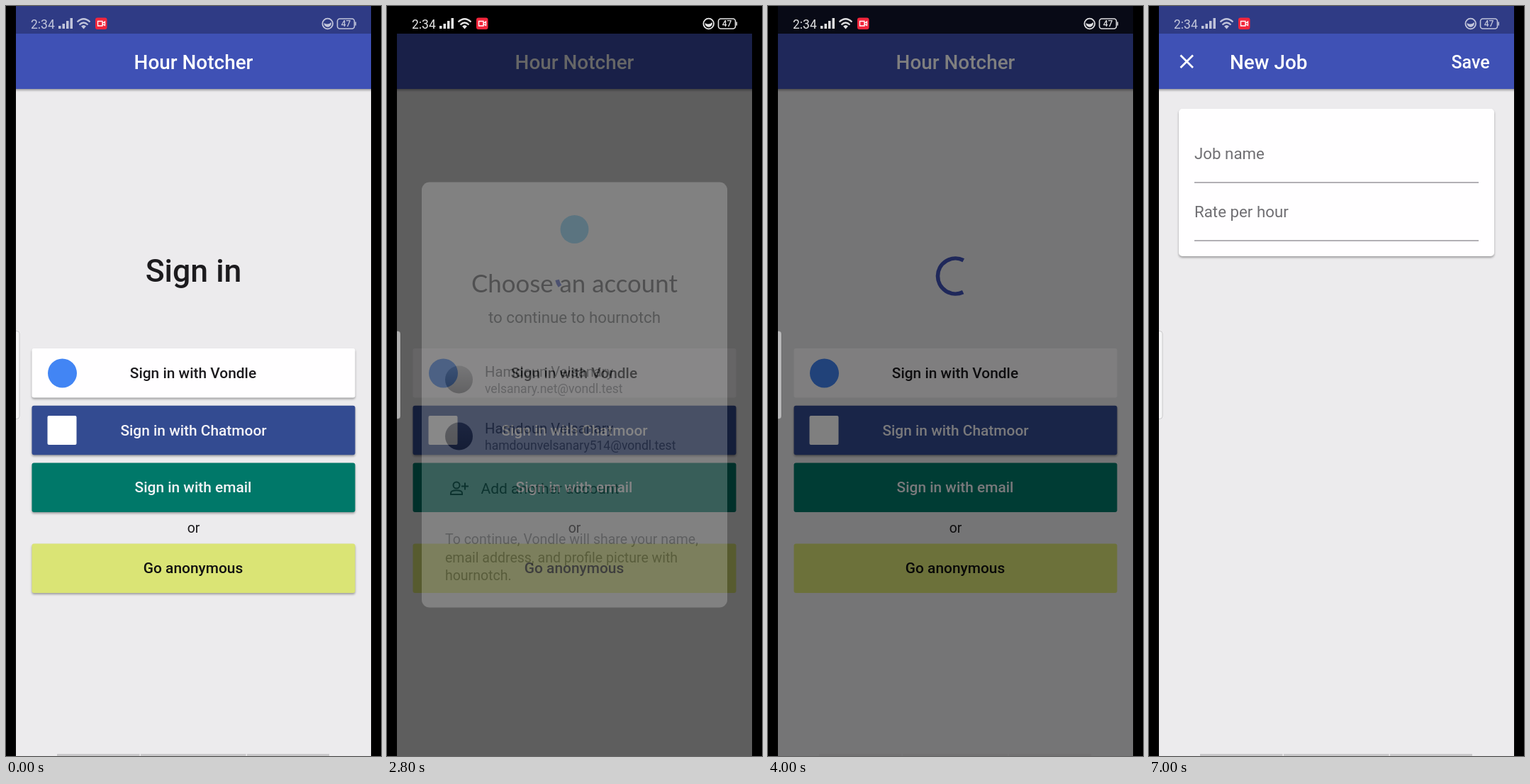
Write an HTML page that moves like this. It is 529 by 1058 pixels and loops after 8000 ms.

```html
<!DOCTYPE html>
<html lang="en">
<head>
<meta charset="utf-8">
<style>
  html, body { margin: 0; width: 100%; height: 100%; overflow: hidden; background: #000; }
  svg { display: block; width: 100vw; height: 100vh; font-family: Roboto, sans-serif; }
  .mid { text-anchor: middle; }
  .title { font-size: 27.9px; font-weight: 500; fill: #fff; }
  .label { font-size: 20.9px; font-weight: 500; text-anchor: middle; }
  .body { font-size: 22.3px; }
  .small { font-size: 19.5px; }
  .name { font-size: 20.2px; fill: #3c4043; }
  .mail { font-size: 17.5px; fill: #5f6368; }
  .tab { font-size: 13.6px; text-anchor: middle; fill: #98979b; }
  .raised { filter: drop-shadow(0 2px 1.4px #0005); }
  .lifted { filter: drop-shadow(0 4px 4px #0006); }
  .line { fill: none; stroke: #fff; stroke-width: 2.8; }
</style>
</head>
<body>
<svg viewBox="0 0 529 1058">
  <defs>
    <clipPath id="screen"><rect x="14" width="501" height="1058"/></clipPath>
    <clipPath id="buttonClip"><rect x="36.5" y="483" width="456" height="69.5" rx="3"/></clipPath>
    <linearGradient id="photoA" x2="0" y2="1"><stop stop-color="#b4b7ba"/><stop offset="1" stop-color="#55585c"/></linearGradient>
    <linearGradient id="photoB" x2="0" y2="1"><stop stop-color="#3a4056"/><stop offset="1" stop-color="#171a26"/></linearGradient>
  </defs>
  <rect width="529" height="1058"/>
  <g clip-path="url(#screen)">
    <rect id="backdrop" x="14" width="501" height="1058" fill="#ecebed"/>
    <rect class="raised" x="8" y="39" width="513" height="78" fill="#3f51b5"/>

    <g id="signIn">
      <text class="title mid" x="264.5" y="88.7">Hour Notcher</text>
      <text id="heading" class="mid" x="264.5" y="388.5" font-size="44.6" font-weight="500" fill="#1c1b1e">Sign in</text>
      <path id="spinner" fill="none" stroke="#3f51b5" stroke-width="5.6"/>
      <rect id="whiteButton" x="36.5" y="483" width="456" height="69.5" rx="3" fill="#fffeff"/>
      <g id="press" clip-path="url(#buttonClip)">
        <rect x="36" y="483" width="457" height="70" fill="#f3f2f5"/>
        <circle cx="316" cy="525" r="125" fill="#e0e0e1"/>
      </g>
      <circle cx="79.5" cy="518" r="20.5" fill="#4285f4"/>
      <text class="label" x="264" y="525" fill="#1c1b1e">Sign in with Vondle</text>
      <rect class="raised" x="36.5" y="563.8" width="456" height="69.5" rx="3" fill="#334b91"/>
      <rect x="58.5" y="578" width="41" height="41" rx="2" fill="#fff"/>
      <text class="label" x="264.5" y="605.8" fill="#f4f3f7">Sign in with Chatmoor</text>
      <rect id="greenButton" x="36.5" y="644.6" width="456" height="69.5" rx="3" fill="#007869"/>
      <text class="label" x="264" y="686.4" fill="#f4f3f7">Sign in with email</text>
      <text class="small mid" x="264.5" y="743" fill="#1c1b1e">or</text>
      <rect id="limeButton" x="36.5" y="758.6" width="456" height="69.5" rx="3" fill="#dae475"/>
      <text class="label" x="264" y="800.4" fill="#111">Go anonymous</text>
    </g>

    <g id="jobs">
      <text class="title mid" x="264" y="88.7">Jobs</text>
      <path class="line" d="M472 78.5H491.500M481.700 69V88"/>
      <circle id="plusRipple" cx="482" cy="79" r="36" fill="#fff" opacity=".14"/>
      <text class="body" x="36.500" y="165" fill="#1c1b1e">Blogging</text>
      <path class="line" d="M472 149.500L479.700 157L472 164.500" style="stroke:#858488"/>
      <path d="M14 196.500H515" stroke="#e6e5e8"/>
      <rect x="14" y="988" width="501" height="70" fill="#f7f7f8"/>
      <path d="M14 988.500H515" stroke="#e0dfe2"/>
      <rect x="80" y="1000" width="35" height="28" rx="3.500" fill="#3f51b5"/>
      <path d="M92.500 1001V996.500H102.500V1001" fill="none" stroke="#3f51b5" stroke-width="3.500"/>
      <path d="M250 1001H279M250 1008.500H279M250 1016H279M250 1023.500H279" stroke="#98979b" stroke-width="3.500"/>
      <circle cx="431.500" cy="1005" r="7" fill="#98979b"/>
      <path d="M417.500 1026V1022C417.500 1012.500 445.500 1012.500 445.500 1022V1026Z" fill="#98979b"/>
      <text class="tab" x="97" y="1048" style="fill:#3f51b5">Jobs</text>
      <text class="tab" x="264" y="1048">Entries</text>
      <text class="tab" x="431" y="1048">Account</text>
    </g>

    <g id="newJob">
      <path class="line" d="M44.500 69.500L62 87M62 69.500L44.500 87"/>
      <text class="title" x="114" y="88.700">New Job</text>
      <text class="title" x="426.500" y="87.700" style="font-size:25px">Save</text>
      <rect class="raised" x="42" y="145" width="445" height="208" rx="5" fill="#fffeff"/>
      <g class="body" fill="#706f73"><text x="64" y="216">Job name</text><text x="64" y="298">Rate per hour</text></g>
      <path d="M64 249H465M64 331H465" stroke="#99979d" stroke-width="1.500"/>
    </g>

    <path id="navHints" d="M72 1056.500H188.500M190 1056.500H338.500M340 1056.500H456" stroke="#c9c8ca" stroke-width="3"/>
    <rect id="dim" x="14" y="39" width="501" height="1019"/>

    <g id="dialog">
      <rect x="49" y="248.500" width="431" height="600" rx="11" fill="#fff"/>
      <circle cx="264.500" cy="315" r="20" fill="#54c5f8"/>
      <text class="mid" x="264.500" y="403.500" fill="#202124" style="font:34.800px Lato,sans-serif">Choose an account</text>
      <text class="body mid" x="264.500" y="447" fill="#3c4043">to continue to hournotch</text>
      <circle cx="101.500" cy="527" r="19.500" fill="url(#photoA)"/>
      <text class="name" x="138" y="523">Hamdoun Velsanary</text>
      <text class="mail" x="138" y="546">velsanary.net@vondl.test</text>
      <circle cx="101.500" cy="607" r="19.500" fill="url(#photoB)"/>
      <text class="name" x="138" y="603">Hamdoun Velsanary</text>
      <text class="mail" x="138" y="626">hamdounvelsanary514@vondl.test</text>
      <g fill="none" stroke="#3c4043" stroke-width="2">
        <circle cx="98" cy="676" r="4.500"/>
        <path d="M90 689V687C90 682 106 682 106 687V689ZM105 677.500H115M110 672.500V682.500"/>
      </g>
      <text class="name" x="132.500" y="688" style="font-size:21px">Add another account</text>
      <g class="small" fill="#5f6368">
        <text x="82" y="759">To continue, Vondle will share your name,</text>
        <text x="82" y="784.500">email address, and profile picture with</text>
        <text x="82" y="810">hournotch.</text>
      </g>
    </g>

    <rect x="8" y="458.500" width="11" height="124" rx="4" fill="#fff" fill-opacity=".5" stroke="#000" stroke-opacity=".16"/>
    <g id="touch">
      <circle r="19" fill="#fff" opacity=".18"/>
      <circle r="14.500" fill="#e4e4ee" opacity=".75"/>
    </g>
    <circle id="touchRing" cx="316" cy="525" r="16" fill="#dededf" stroke="#cbcbcc" stroke-width="1.500"/>

    <rect x="14" width="501" height="39" fill="#2f3b85"/>
    <rect id="statusDim" x="14" width="501" height="39"/>
    <g id="status" fill="#fff">
      <text x="35" y="31.500" font-size="17.500">2:34</text>
      <path d="M74 32V28H77.500V32ZM79.500 32V25H83V32ZM85 32V21H88.500V32ZM90.500 32V17H94V32Z"/>
      <path d="M100.500 22.500Q109.500 14 118.500 22.500M103.500 26.500Q109.500 20.500 115.500 26.500" fill="none" stroke="#fff" stroke-width="2.200"/>
      <path d="M106 28.500Q109.500 25.500 113 28.500L109.500 32.500Z"/>
      <circle cx="453.700" cy="25" r="7.300" fill="none" stroke="#fff" stroke-width="1.800"/>
      <path d="M448.700 24Q454 27.500 458.700 23A5 5 0 0 1 448.700 26Z"/>
      <rect x="467.500" y="18" width="24" height="14" rx="3.500" fill="none" stroke="#fff" stroke-width="1.600"/>
      <path d="M492.500 22.500H494V27.500H492.500Z"/>
      <text class="mid" x="479.500" y="29.300" font-size="12" font-weight="500">47</text>
    </g>
    <rect x="126" y="16.500" width="16.500" height="16.500" rx="3" fill="#f3263c"/>
    <path d="M129.500 21.500H136V28H129.500ZM136 24.500L139.500 22V27.500L136 25.500" fill="none" stroke="#fff" stroke-width="1.300"/>
  </g>
</svg>
<script>
const LOOP = 8000, STEP = 200;
const el = id => document.getElementById(id);
const show = (id, on) => { el(id).style.display = on ? '' : 'none'; };
const fade = (id, amount) => el(id).setAttribute('opacity', amount);
const ramp = (t, from, to) => Math.min(1, Math.max(0, (t - from) / (to - from)));

// Cubic bezier (0.4, 0, 0.2, 1), solved by bisection.
function ease(x) {
  let low = 0, high = 1;
  for (let i = 0; i < 24; i++) {
    const s = (low + high) / 2, r = 1 - s;
    if (1.2 * r * r * s + 0.6 * r * s * s + s ** 3 < x) low = s; else high = s;
  }
  return low * low * (3 - 2 * low);
}

function spinnerPath(t) {
  const elapsed = Math.max(0, 110 + 1.333 * (t - 1800) + 0.05 * Math.max(0, t - 3800));
  const cycle = elapsed / 1333, turn = Math.floor(cycle), phase = cycle - turn;
  const head = 270 * ease(ramp(phase, 0, 0.5)), tail = 270 * ease(ramp(phase, 0.5, 1));
  const base = 216 * turn + 306 * phase - 6;
  const point = degrees => {
    const a = degrees * Math.PI / 180;
    return `${264.5 + 25 * Math.sin(a)} ${381 - 25 * Math.cos(a)}`;
  };
  return `M${point(base + tail)}A25 25 0 ${head - tail > 180 ? 1 : 0} 1 ${point(base + head)}`;
}

function placeTouch(t) {
  const taps = [[1600, 1800, 316, 525], [3800, 4000, 294, 543], [6400, 6600, 486, 87]];
  const tap = taps.find(([from, to]) => t >= from && t < to);
  show('touch', tap);
  if (tap) el('touch').setAttribute('transform', `translate(${tap[2]} ${tap[3]})`);
}

function draw(t) {
  const loading = t >= 1800, settled = t >= 2000, pressed = loading && !settled;
  const onJobs = t >= 5000 && t < 6800;
  show('signIn', t < 5000);
  show('jobs', onJobs);
  show('newJob', t >= 6800);
  el('backdrop').setAttribute('fill', onJobs ? '#faf9fc' : '#ecebed');

  show('heading', !loading);
  show('spinner', loading);
  if (loading) el('spinner').setAttribute('d', spinnerPath(t));
  show('press', pressed);
  show('touchRing', pressed);
  fade('touchRing', 0.7);
  el('whiteButton').setAttribute('class', settled ? '' : pressed ? 'lifted' : 'raised');
  for (const id of ['greenButton', 'limeButton']) el(id).setAttribute('class', settled ? '' : 'raised');

  const dim = ramp(t, 2300, 2600) * (1 - ramp(t, 3950, 4250));
  fade('dim', 0.6 * dim);
  fade('statusDim', dim);
  fade('status', 0.7 + 0.2 * dim);
  fade('navHints', 1 - dim);
  fade('dialog', t < 3800 ? 0.22 + 0.78 * ramp(t, 2800, 3000) : 0);
  show('dialog', t >= 2800 && t < 3800);

  show('plusRipple', t >= 6600);
  placeTouch(t);
}

function tick() {
  const t = performance.now() % LOOP;
  draw(Math.floor(t / STEP) * STEP);
  requestAnimationFrame(tick);
}
tick();
</script>
</body>
</html>
```
